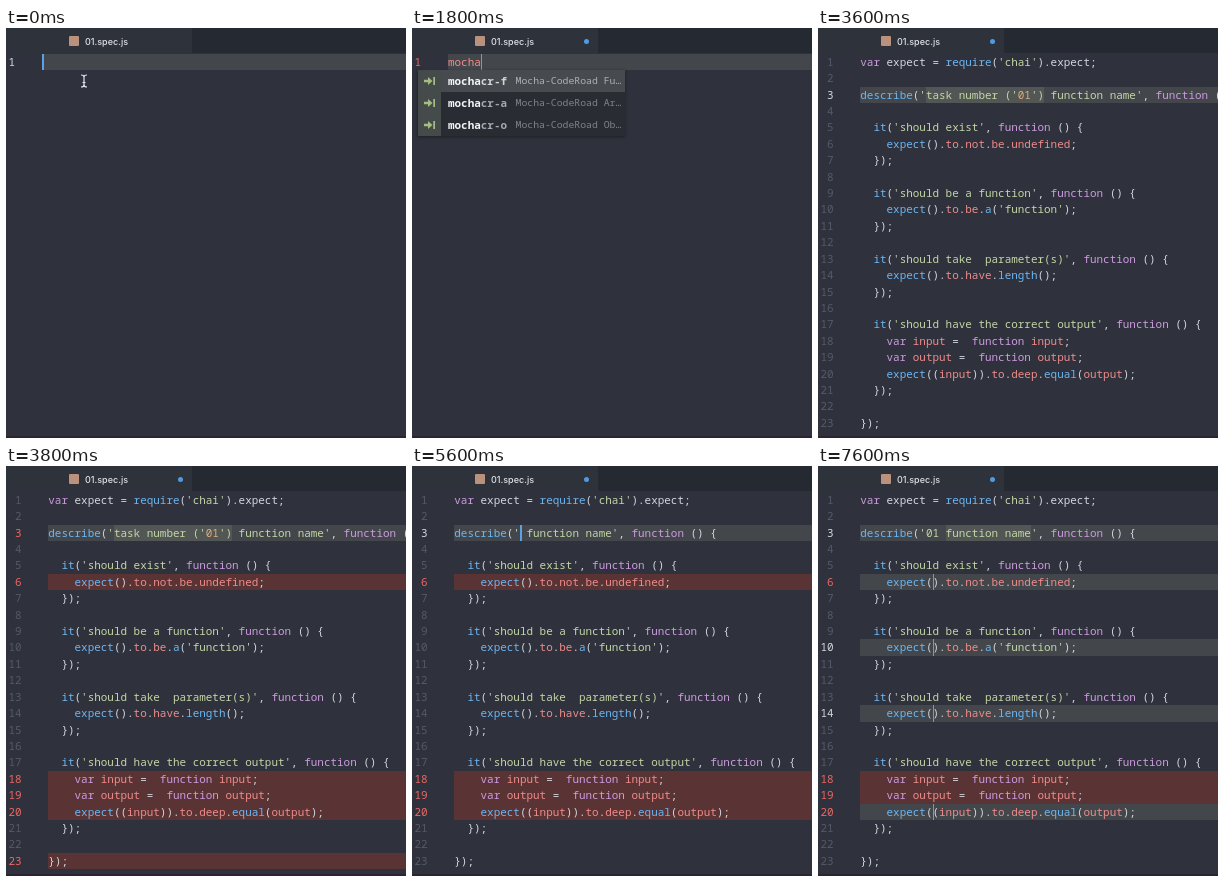
An HTML page that plays this animation: 400 px wide and 410 px high, repeating every 8000 ms.

```html
<!DOCTYPE html>
<html lang="en">
<head>
<meta charset="utf-8">
<title>Snippet editor</title>
<style>
  html, body { margin: 0; width: 100%; height: 100%; overflow: hidden; background: #2f323c; }
  #stage { position: relative; width: 400px; height: 410px; overflow: hidden; background: #2f323c;
    font: 10.95px/16.41px "Noto Sans Mono", "DejaVu Sans Mono", monospace; color: #d3d7de; }
  #stage div { position: absolute; white-space: pre; }
  .bar { left: 186px; top: 0; width: 214px; height: 25px; background: #252932; }
  .tab { left: 0; top: 0; width: 186px; height: 25px; background: #2e323b; }
  .icon { left: 63px; top: 8px; width: 10px; height: 10px; border-radius: 1px; background: #b9917c; }
  .title { left: 79px; top: 7px; font: 500 9px/13px Inter, "Open Sans", sans-serif; color: #dfe2e7; }
  .dot { left: 172px; top: 11px; width: 5px; height: 5px; border-radius: 50%; background: #4f9be3; }
  .foot { left: 0; top: 408px; width: 400px; height: 2px; background: #2c2531; }
  .band { right: 0; height: 16.4px; background: #43474c; }
  .band.bad { background: #5a3335; }
  .sel { height: 16.4px; background: #525756; }
  .num { width: 20px; text-align: right; color: #555a66; }
  .num.on { color: #d5d8dd; }
  .num.bad { color: #ee6763; }
  .caret { width: 1.6px; height: 16.4px; background: #5aa2e6; }
  .kw { color: #cd9be0; } .fn { color: #6cb6f2; } .str { color: #c3d6a5; }
  .id { color: #ee8c8a; } .no { color: #dfae7e; }
  .pop { left: 6px; top: 42px; width: 207px; height: 65.5px; background: #2a2c33;
    box-shadow: 0 1px 3px #1d1f25; }
  .row { left: 0; width: 207px; height: 21.8px; line-height: 21.8px; color: #a3a8b0; }
  .row.on { background: #474b50; color: #d2d5da; }
  .row b { color: #f2f4f6; }
  .row i { position: absolute; left: 97.5px; font-style: normal; font-size: 9.8px; color: #7d828b; }
  .row.on i { color: #acb0b7; }
  .row span { position: absolute; left: 30px; font-weight: 600; }
  .row svg { position: absolute; left: 0; top: 0; background: #454a4b; }
  .beam { position: absolute; left: 74px; top: 46px; }
</style>
</head>
<body>
<div id="stage"></div>
<script>
const stage = document.getElementById('stage');
const CH = 6.57, LH = 16.41, TOP = 25.8, LEFT = 42.3;

const code = [
  "var expect = require('chai').expect;",
  "",
  "",
  "",
  "  it('should exist', function () {",
  "    expect().to.not.be.undefined;",
  "  });",
  "",
  "  it('should be a function', function () {",
  "    expect().to.be.a('function');",
  "  });",
  "",
  "  it('should take  parameter(s)', function () {",
  "    expect().to.have.length();",
  "  });",
  "",
  "  it('should have the correct output', function () {",
  "    var input =  function input;",
  "    var output =  function output;",
  "    expect((input)).to.deep.equal(output);",
  "  });",
  "",
  "});"
];

const word = (text, more) => ({ word: text, ...more });
const suite = (name, more) => ({ name, cur: [3], bad: [], ...more });
const long = "task number ('01')";
const picked = { sel: [10, 18] };
const broken = [3, 6, 18, 19, 20, 23], lint = [6, 18, 19, 20];
const at = col => [[3, col]];
const next = { sel: [13, 13], cur: [3, 6, 10, 14, 20], bad: lint };
const mirrors = [[6, 11], [10, 11], [14, 11], [20, 11]];

// [start in ms, what the editor shows]
const steps = [
  [0, word('', { caret: 1, beam: 1 })],
  [400, word('')],
  [800, word('mo', { caret: 1 })],
  [1000, word('moch', { caret: 1, pop: 1 })],
  [1200, word('mocha', { caret: 1, pop: 1 })],
  [2200, word('mocha', { pop: 1 })],
  [2600, word('mocha', { caret: 1, pop: 1 })],
  [3000, word('mocha', { pop: 1 })],
  [3400, word('mocha', { caret: 1, pop: 1 })],
  [3600, suite(long, picked)],
  [3800, suite(long, { ...picked, bad: broken })],
  [5600, suite('', { bad: lint, carets: at(10) })],
  [6000, suite('', { bad: lint })],
  [6200, suite('0', { bad: lint, carets: at(11) })],
  [6400, suite('01', { bad: lint, carets: at(12) })],
  [6800, suite('01', { ...next, carets: mirrors })],
  [7200, suite('01', next)],
  [7600, suite('01', { ...next, carets: mirrors })]
];

const box = (cls, x, y, html = '', css = '') =>
  `<div class="${cls}" style="left:${x}px;top:${y}px;${css}">${html}</div>`;
const lineY = n => TOP + (n - 1) * LH;
const colX = c => LEFT + c * CH;

function paint(text, plain) {
  const token = /('[^']*')|\b(var|function)\b|([a-z]\w*)(?=\()|([a-z]\w*)|(\d+)/g;
  return text.replace(token, (m, str, kw, fn, id) => {
    const cls = str ? 'str' : kw ? 'kw' : fn ? 'fn' : id ? (plain ? '' : 'id') : 'no';
    return `<span class="${cls}">${m}</span>`;
  });
}

const chrome = '<div class="bar"></div><div class="tab"></div><div class="icon"></div>' +
  '<div class="title">01.spec.js</div><div class="foot"></div>';
const dot = '<div class="dot"></div>';
const beam = '<svg class="beam" width="8" height="14" fill="none" stroke="#e4e6ea" stroke-width="1.2">' +
  '<path d="M1 1Q4 1 4 3V11Q4 13 1 13M7 1Q4 1 4 3M4 11Q4 13 7 13M2.5 8.5H5.5"/></svg>';
const arrow = '<svg width="23" height="22"><path d="M6 9.8h4V7l4.5 4-4.5 4v-2.8H6zM15.3 7h1.7v8h-1.7z" fill="#a5bd83"/></svg>';

function popup(typed) {
  const rows = [['f', 'Fu'], ['a', 'Ar'], ['o', 'Ob']].map(([key, kind], i) => {
    const rest = 'mochacr-'.slice(typed.length) + key;
    return box('row' + (i ? '' : ' on'), 0, i * 21.85,
      `${arrow}<span><b>${typed}</b>${rest}</span><i>Mocha-CodeRoad ${kind}…</i>`);
  });
  return `<div class="pop">${rows.join('')}</div>`;
}

function wordView(s) {
  const x = 36, y = lineY(1);
  return (s.word ? dot : '') +
    box('band', x, y) +
    box('num ' + (s.word.length > 4 ? 'bad' : 'on'), -11, y, 1) +
    box('id', x, y, s.word) +
    (s.caret ? box('caret', x + s.word.length * CH, y) : '') +
    (s.pop ? popup(s.word) : '') +
    (s.beam ? beam : '');
}

function suiteView(s) {
  let html = dot;
  code.forEach((text, i) => {
    const n = i + 1, y = lineY(n);
    const on = s.cur.includes(n), bad = s.bad.includes(n);
    if (on || bad) html += box(on ? 'band' : 'band bad', 42, y);
    if (n === 3) {
      text = `describe('${s.name} function name', function () {`;
      if (s.sel) html += box('sel', colX(s.sel[0]), y, '', `width:${s.sel[1] * CH}px`);
    }
    html += box('num' + (bad ? ' bad' : on ? ' on' : ''), -4.4, y, n);
    html += box('', LEFT, y, paint(text, n === 1));
  });
  for (const [n, c] of s.carets || []) html += box('caret', colX(c), lineY(n));
  return html;
}

let shown = -1;
function tick() {
  const t = performance.now() % 8000;
  const i = steps.findLastIndex(step => step[0] <= t);
  if (i !== shown) {
    const s = steps[i][1];
    stage.innerHTML = chrome + ('word' in s ? wordView(s) : suiteView(s));
    shown = i;
  }
  requestAnimationFrame(tick);
}
tick();
</script>
</body>
</html>
```
